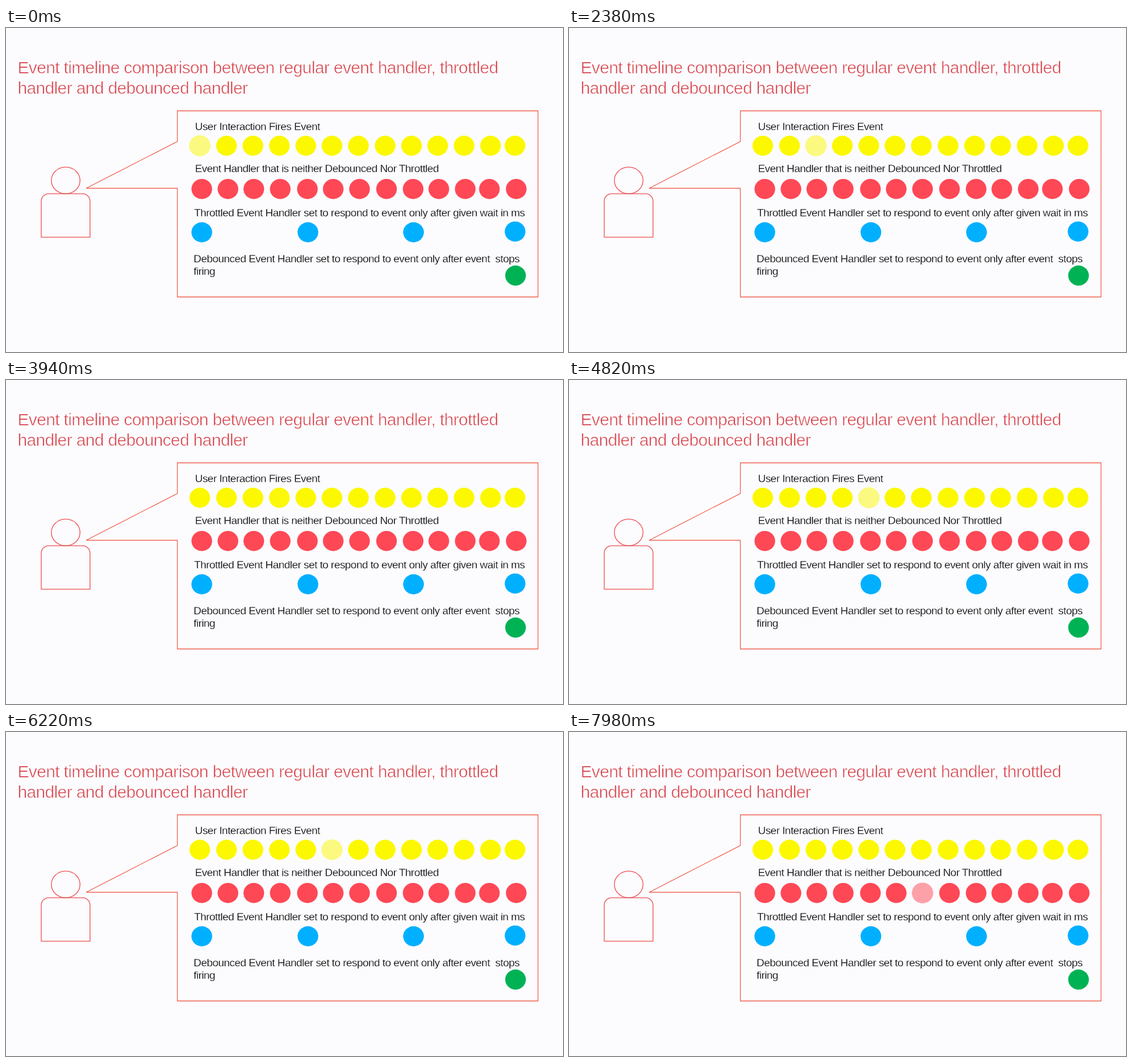
Recreate the animation shown at these times as an HTML page. Size 980 by 571 pixels, loop 8 s.

```html
<!DOCTYPE html>
<html lang="en">
<head>
<meta charset="utf-8">
<title>Event handler timeline</title>
<style>
html, body { margin: 0; width: 100%; height: 100%; overflow: hidden; background: #fcfcff; }
svg { display: block; width: 100vw; height: 100vh; }
/* A stroke in the background colour thins the letters to a light weight. */
text { font-family: "Liberation Sans", Arial, sans-serif; white-space: pre; stroke: #fcfcff; }
.title { font-size: 30px; letter-spacing: -.022em; fill: #d8434a; stroke-width: .7; }
.label { font-size: 19px; letter-spacing: -.029em; fill: #000; stroke-width: .3; }
.line { fill: none; stroke: #ee4c4c; stroke-width: 1.3; }
.callout { stroke: #f0604e; }
</style>
</head>
<body>
<svg viewBox="0 0 980 571">
  <g class="title">
    <text x="20.5" y="79.5">Event timeline comparison between regular event handler, throttled</text>
    <text x="20.5" y="115.5">handler and debounced handler</text>
  </g>
  <g class="line">
    <path class="callout" d="M301.5 200V146H936V474H301.5V282.5H141Z"/>
    <ellipse cx="105" cy="268.7" rx="25.2" ry="23.5"/>
    <path d="M62 368.6V305A12.8 12.8 0 0 1 74.8 292.2H135A12.8 12.8 0 0 1 147.8 305V368.6Z"/>
  </g>
  <g class="label">
    <text x="332.5" y="180">User Interaction Fires Event</text>
    <text x="332.5" y="254">Event Handler that is neither Debounced Nor Throttled</text>
    <text x="331" y="331.5">Throttled Event Handler set to respond to event only after given wait in ms</text>
    <text x="330" y="412.5">Debounced Event Handler set to respond to event only after event  stops</text>
    <text x="330" y="435">firing</text>
  </g>
  <g id="dots"></g>
</svg>
<script>
const LOOP = 8000;
const STEP = 1210;      // time from one event to the next
const PULSE = STEP / 2; // the event pulses first, its handlers follow
const LEAD = 285;       // the first pulse is already running at time 0

const layer = document.getElementById('dots');
const dots = [];

function addDot(x, y, fill, start) {
  const el = document.createElementNS('http://www.w3.org/2000/svg', 'ellipse');
  const attrs = { cx: x, cy: y, rx: 18.2, ry: 17.7, fill };
  for (const name in attrs) el.setAttribute(name, attrs[name]);
  layer.appendChild(el);
  dots.push({ el, x, y, start });
}

const eventStart = i => i * STEP - LEAD;
const handlerStart = i => eventStart(i) + PULSE;

[341, 388, 434.5, 481, 527.5, 573.5, 620, 667, 713.5, 759.5, 806, 852.5, 895.5]
  .forEach((x, i) => addDot(x, 207.5, '#fcf800', eventStart(i)));
[344.5, 390.5, 436, 482.5, 530.3, 575.7, 622, 669.5, 716.3, 761.5, 808, 850.5, 897.7]
  .forEach((x, i) => addDot(x, 283.7, '#ff4855', handlerStart(i)));
[344.5, 531.2, 717, 895.7]
  .forEach((x, i) => addDot(x, i === 3 ? 358.7 : 360, '#00b0ff', handlerStart(i * 4)));
addDot(896.5, 436.3, '#00b254', Infinity);

// Fade to half, hold, fade back, while swelling by 5%.
function draw(t) {
  for (const { el, x, y, start } of dots) {
    const p = (t - start) / PULSE;
    const edge = Math.max(0, Math.min(p, 1 - p));
    const scale = 1 + 0.1 * edge;
    el.setAttribute('opacity', 1 - 0.5 * Math.min(1, edge / 0.2));
    el.setAttribute('transform', `translate(${x} ${y}) scale(${scale}) translate(${-x} ${-y})`);
  }
}

const t0 = performance.now();
function tick() {
  draw((performance.now() - t0) % LOOP);
  requestAnimationFrame(tick);
}
draw(0);
requestAnimationFrame(tick);
</script>
</body>
</html>
```
